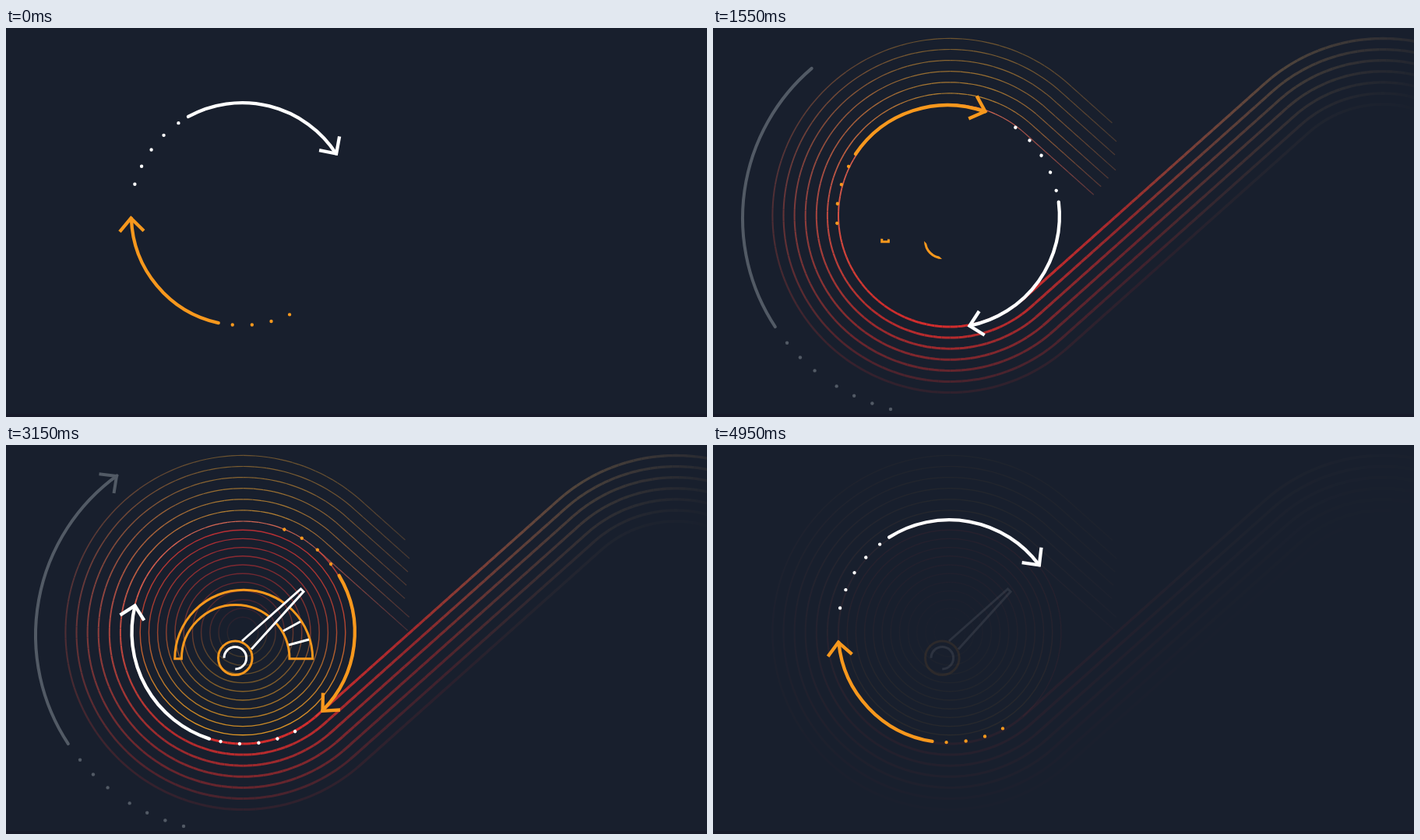
Animation, 900 px wide and 500 px high, one loop 5000 ms. Source, as an HTML page with a canvas:

```html
<!DOCTYPE html>
<html lang="en">
<head>
<meta charset="utf-8">
<title>Gauge loop</title>
<style>
  html, body { margin: 0; width: 100%; height: 100%; overflow: hidden; background: #181f2d; }
  canvas { display: block; width: 900px; height: 500px; }
</style>
</head>
<body>
<canvas id="stage" width="900" height="500"></canvas>
<script>
const ctx = document.getElementById('stage').getContext('2d');
const LOOP = 5000, RAD = Math.PI / 180;
const BG = [24, 31, 45], RED = [210, 45, 42], CORAL = [228, 92, 76],
      AMBER = [225, 155, 50], PEACH = [245, 115, 90], TAN = [215, 160, 95];
const ORANGE = '#f7981d', WHITE = '#fff', GRAY = '#525a65';

const clamp = v => Math.max(0, Math.min(1, v));
const lerp = (a, b, f) => a + (b - a) * f;
const ramp = (v, from, to) => clamp((v - from) / (to - from));
const mix = (a, b, f) => a.map((c, i) => lerp(c, b[i], f));
const rgb = c => `rgb(${c.map(Math.round)})`;

// Linear interpolation through [position, value] pairs
function track(steps, v) {
  if (v <= steps[0][0]) return steps[0][1];
  for (let i = 1; i < steps.length; i++) {
    const [v0, a] = steps[i - 1], [v1, b] = steps[i];
    if (v <= v1) return lerp(a, b, (v - v0) / (v1 - v0));
  }
  return steps[steps.length - 1][1];
}

function stroke(color, width, draw, cap = 'butt') {
  ctx.strokeStyle = color;
  ctx.lineWidth = width;
  ctx.lineCap = cap;
  ctx.beginPath();
  draw();
  ctx.stroke();
}

function poly(...pts) {
  pts.forEach(([x, y], i) => i ? ctx.lineTo(x, y) : ctx.moveTo(x, y));
}

const arc = (x, y, r, from, to, ccw) => ctx.arc(x, y, r, from * RAD, to * RAD, ccw);

function dot(x, y, r, color) {
  ctx.fillStyle = color;
  ctx.beginPath();
  ctx.arc(x, y, r, 0, 7);
  ctx.fill();
}

// ---- Track lines: upper right curve, slope, big turn, tail ----
const HUB = [304, 241], BEND = [860, 241], R_IN = 143, R_OUT = 227.5, GAP = 14.1;
const TILT = Math.acos((R_IN + R_OUT) / (BEND[0] - HUB[0]));
const NX = Math.cos(TILT), NY = Math.sin(TILT);
const S1 = 231, S2 = S1 + 415, S3 = S2 + R_IN * (2 * Math.PI - 2 * TILT), S4 = S3 + 160;
const SPEED = 0.918, STEP = 10;

function trackPoint(k, s) {
  const r1 = R_IN + GAP * k, r2 = R_OUT - GAP * k;
  if (s <= S1) {
    const a = TILT - Math.PI + (S1 - s) / R_OUT;
    return [BEND[0] + r2 * Math.cos(a), BEND[1] + r2 * Math.sin(a)];
  }
  if (s <= S2) {
    const f = (s - S1) / (S2 - S1);
    return [lerp(BEND[0] - NX * r2, HUB[0] + NX * r1, f),
            lerp(BEND[1] - NY * r2, HUB[1] + NY * r1, f)];
  }
  const a = TILT + (Math.min(s, S3) - S2) / R_IN, run = Math.max(0, s - S3);
  return [HUB[0] + r1 * Math.cos(a) + NY * run, HUB[1] + r1 * Math.sin(a) + NX * run];
}

const ENTRY_ALPHA = [[0, .04], [40, .1], [S1, .33], [350, .5], [480, .75], [S2, .95]];

function trackStyle(k, s) {
  const dim = 1 - .145 * k, topDim = .85 - .07 * k;
  if (s <= S2) {
    return [mix(TAN, RED, ramp(s, S1 - 40, 480)), track(ENTRY_ALPHA, s) * dim, 3.3];
  }
  const u = (s - S2) / (S3 - S2), top = k ? AMBER : PEACH;
  let color = u < .55 ? mix(RED, CORAL, ramp(u, .3, .55)) : mix(CORAL, top, ramp(u, .55, .8));
  let alpha = lerp(dim, topDim, ramp(u, .2, .84));
  if (s > S3 - 60) {
    const f = ramp(s, S3 - 60, S4);
    color = mix(color, CORAL, f * (1 - k / 9));
    alpha *= 1 - .75 * f;
  }
  return [color, alpha, lerp(3, 1.2, ramp(u, .2, .75))];
}

function drawTracks(t, fade) {
  const head = Math.min(S4, t * SPEED);
  ctx.save();
  ctx.globalCompositeOperation = 'lighten';
  for (let k = 6; k >= 0; k--) {
    for (let s = 0; s < head; s += STEP) {
      const end = Math.min(s + STEP, head), mid = (s + end) / 2;
      const a = trackPoint(k, s), m = trackPoint(k, mid), b = trackPoint(k, end);
      if (s > S3 && b[0] > 518) break;
      const [color, alpha, width] = trackStyle(k, mid);
      stroke(rgb(mix(BG, color, alpha * fade)), width, () => poly(a, m, b));
    }
  }
  ctx.restore();
}

function drawRings(alpha) {
  if (alpha <= 0) return;
  const [x, y] = HUB;
  ctx.globalAlpha = alpha * .75;
  stroke(rgb([222, 72, 62]), 1.5, () => arc(x, y, R_IN, -49, 49));
  for (let j = 1; j < 12; j++) {
    const r = R_IN - 11.2 * j, g = ctx.createLinearGradient(0, y - r, 0, y + r);
    g.addColorStop(0, 'rgb(205,48,52)');
    g.addColorStop(.45, 'rgb(200,72,50)');
    g.addColorStop(.75, 'rgb(225,140,42)');
    g.addColorStop(1, 'rgb(247,165,35)');
    ctx.globalAlpha = alpha * (.96 - .078 * j);
    stroke(g, 1.4, () => arc(x, y, r, 0, 360));
  }
  ctx.globalAlpha = 1;
}

// ---- Gauge ----
const NEEDLE = [[303, 252], [378.5, 185], [382, 188.5], [315, 262.5]];

function drawDial(t, alpha) {
  const sweep = 180 * ramp(t, 1540, 2150);
  if (sweep <= 0 || alpha <= 0) return;
  ctx.save();
  ctx.globalAlpha = alpha;
  ctx.beginPath();
  ctx.moveTo(305, 277);
  ctx.lineTo(150, 277);
  arc(305, 275, 155, 180, 180 + sweep);
  if (sweep >= 180) ctx.lineTo(460, 277);
  ctx.clip();
  // Keep the inside of the needle clear
  ctx.beginPath();
  ctx.rect(0, 0, 900, 500);
  poly(...NEEDLE);
  ctx.clip('evenodd');
  stroke(ORANGE, 3, () => {
    arc(305.2, 274.8, 88.5, 180, 360);
    arc(294.7, 274.8, 69.3, 0, 180, true);
    ctx.closePath();
  });
  stroke(WHITE, 3, () => {
    poly([356, 239], [378, 227]);
    poly([363, 257], [389, 250]);
  });
  ctx.restore();
}

function drawNeedle(t, alpha) {
  const reach = lerp(-23, 130, ramp(t, 1525, 2150));
  if (t < 1525 || alpha <= 0) return;
  ctx.save();
  ctx.globalAlpha = alpha;
  // Diagonal wipe from lower left to upper right
  ctx.translate(294.3, 273.7);
  ctx.rotate(-45 * RAD);
  ctx.beginPath();
  ctx.rect(-40, -60, 40 + reach, 120);
  ctx.clip();
  ctx.rotate(45 * RAD);
  ctx.translate(-294.3, -273.7);
  stroke(ORANGE, 3, () => arc(294.3, 273.7, 21.8, 0, 360));
  stroke(WHITE, 3, () => arc(294.3, 273.7, 14.3, 180, 450));
  stroke(WHITE, 3, () => poly(...NEEDLE));
  ctx.restore();
}

// ---- Outer gray arrow ----
const GX = 291.5, GY = 244.5, GR = 253.5;
const GRAY_DOTS = [104.5, 110.1, 115.8, 121.6, 129.4, 135.1, 140.8];
const GRAY_HEAD = [[860, 103.5], [900, 112], [1100, 152], [1550, 229.3], [1580, 234]];
const GRAY_TAIL = [[3550, 104], [3850, 164], [4050, 204], [4200, 234]];

function drawGray(t) {
  const head = track(GRAY_HEAD, t), tail = track(GRAY_TAIL, t);
  for (const a of GRAY_DOTS) {
    if (a < head && (a > tail || t < 3550)) {
      dot(GX + GR * Math.cos(a * RAD), GY + GR * Math.sin(a * RAD), 2.2, GRAY);
    }
  }
  const from = Math.max(146.6, tail);
  if (head > from) stroke(GRAY, 4, () => arc(GX, GY, GR, from, head), 'round');
  if (t >= 1590 && t < 4230) {
    stroke(GRAY, 4, () => poly([119.5, 37.3], [142, 40], [138.5, 62]));
  }
}

// ---- Turning arrows ----
const DRIFT_X = [[0, 0], [900, -1.4], [1550, -2.2], [2450, 0], [3150, 2], [4050, -1.4], [5000, 0]];
const DRIFT_Y = [[0, 0], [900, 3.2], [1550, 1.8], [2450, 0], [3150, .9], [4050, 2.7], [5000, 0]];

function arrow(color, r, from, to, head, dots, first, gap) {
  stroke(color, 4.3, () => arc(0, 0, r, from, to), 'round');
  stroke(color, 4.3, () => poly(...head));
  for (let i = 0; i < dots; i++) {
    const a = (first + gap * i) * RAD;
    dot((r - .4) * Math.cos(a), (r - .4) * Math.sin(a), 2.2, color);
  }
}

function drawArrows(t) {
  ctx.save();
  ctx.translate(303.3 + track(DRIFT_X, t), 239.9 + track(DRIFT_Y, t));
  ctx.rotate(t / LOOP * 2 * Math.PI);
  arrow(ORANGE, 142.5, 102.3, 178, [[-157.3, 22.1], [-142.9, 4.8], [-126.3, 21]], 4, 64.6, 10.13);
  arrow(WHITE, 143.8, 241.1, 326.8, [[98.7, -82.9], [120.7, -78.5], [124.7, -100.7]], 5, 195.8, 9.83);
  ctx.restore();
}

function render(t) {
  ctx.fillStyle = rgb(BG);
  ctx.fillRect(0, 0, 900, 500);
  ctx.fillStyle = '#171a29';
  ctx.fillRect(0, 496, 900, 4);
  const fade = 1 - ramp(t, 4430, 5000);
  drawTracks(t, fade);
  drawRings(ramp(t, 1600, 2150) * fade);
  drawGray(t);
  drawDial(t, 1 - ramp(t, 4430, 4900));
  drawNeedle(t, fade);
  drawArrows(t);
}

const start = performance.now();
function tick() {
  render((performance.now() - start) % LOOP);
  requestAnimationFrame(tick);
}
tick();
</script>
</body>
</html>
```
